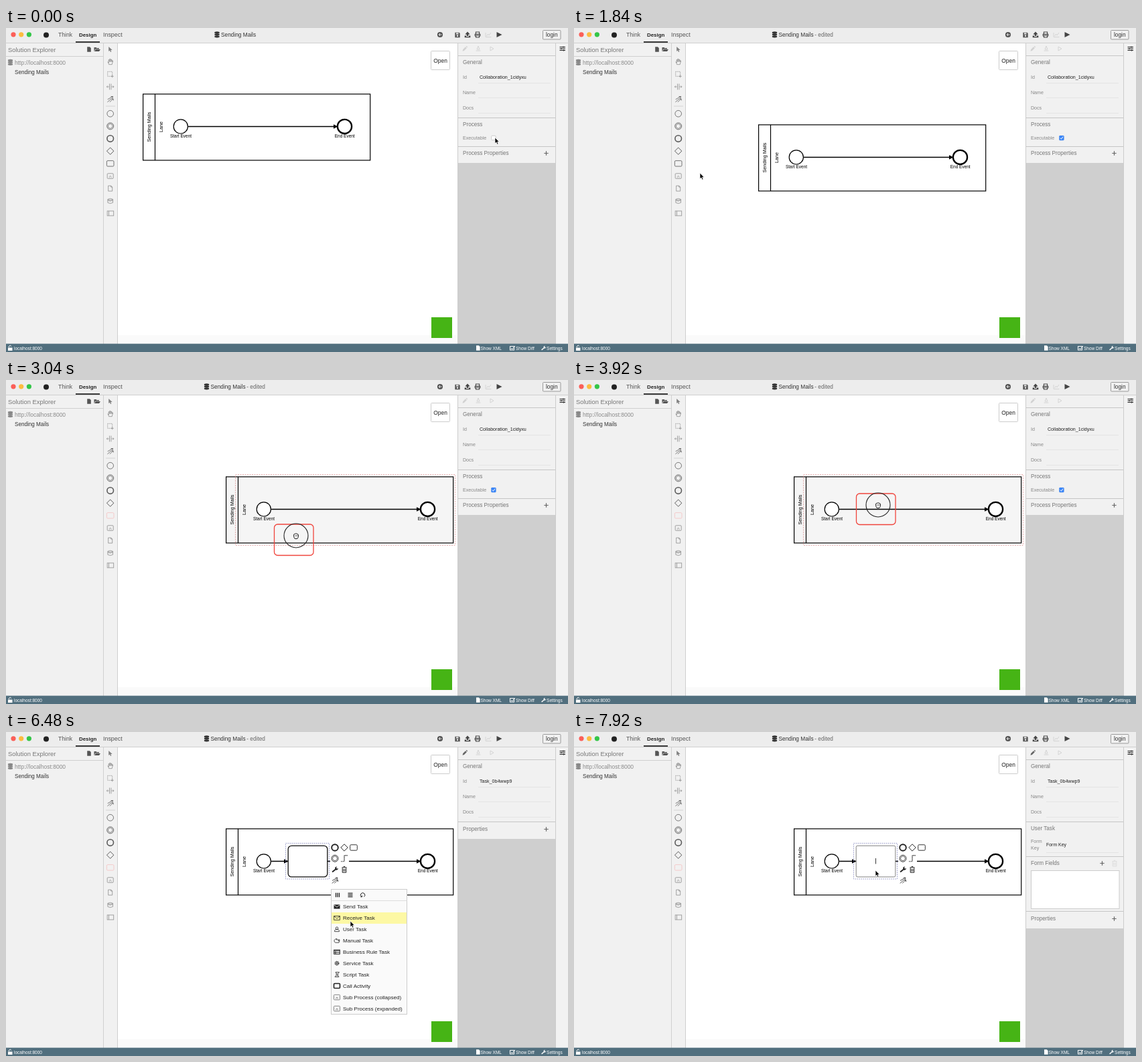
Animation of 839x485 px, one loop 8000 ms. Source, as an HTML page:

```html
<!DOCTYPE html>
<html lang="en">
<head>
<meta charset="utf-8">
<title>Process modeler</title>
<style>
  html, body { margin: 0; width: 100%; height: 100%; overflow: hidden; background: #fff; }
  svg { display: block; width: 100vw; height: 100vh; }
  text { font-family: "Liberation Sans", Arial, sans-serif; white-space: pre; }
  .mid { text-anchor: middle; }
  .line { fill: none; stroke: #222; }
  .grey { fill: none; stroke: #777; stroke-width: .9; }
  .pale { fill: none; stroke: #d4d4d4; }
</style>
</head>
<body>
<svg id="stage" viewBox="0 0 839 485"></svg>
<script>
const text = (x, y, size, str, fill = '#333', more = '') =>
  `<text x="${x}" y="${y}" font-size="${size}" fill="${fill}" ${more}>${str}</text>`;
const rect = (x, y, w, h, fill, more = '') =>
  `<rect x="${x}" y="${y}" width="${w}" height="${h}" fill="${fill}" ${more}/>`;
const path = (d, more = 'class="line"') => `<path d="${d}" ${more}/>`;
const circle = (x, y, r, more = 'class="line"') => `<circle cx="${x}" cy="${y}" r="${r}" ${more}/>`;
const group = (id, body, more = '') => `<g id="${id}" ${more}>${body}</g>`;
const at = (x, y, body, more = '') => `<g transform="translate(${x} ${y})" ${more}>${body}</g>`;
const fill = c => `fill="${c}"`;

// Small icons, each drawn around its own centre
const icon = {
  stack: c => [-2.9, 0, 2.9].map(y =>
    path(`M-3.6 ${y - 1}q3.6 -1.5 7.2 0v1.8q-3.6 1.5 -7.2 0z`, fill(c))).join(''),
  plus: c => path('M-3.2 0H3.2M0 -3.2V3.2', `stroke="${c}" stroke-width="1.2"`),
  file: c => path('M-2.8 -3.8H1L2.8 -2V3.8H-2.8z', fill(c)),
  folder: c => path('M-4.5 3V-3H-1.5L-.5 -2H3V-.5H-2.5z M-2 0H5L3 3H-4z', fill(c)),
  pen: c => path('M-3.5 3.8L-2.8 1L1 -2.8L2.9 -1L-1 2.9zM1.6 -3.4L3.4 -1.6L4 -3L2.6 -4z', fill(c)),
  bolt: () => path('M-4.3 4.3L1.5 -.8M-4 .3L3.5 -4M.8 -4H4L3 -1M-.8 4.3L4 -.5M1.5 -.5H4.5V2', 'class="line" stroke-width=".8"'),
  box: () => rect(-5.3, -4.2, 10.6, 8.4, 'none', 'rx="1.5" stroke="#333"'),
  diamond: () => path('M0 -5.2L5.2 0L0 5.2L-5.2 0z'),
  ring: w => circle(0, 0, 4.8, `class="line" stroke-width="${w}"`),
  double: () => circle(0, 0, 5, 'class="line" stroke-width=".9"') + circle(0, 0, 3.4, 'class="line" stroke-width=".7"'),
  wrench: c => path('M-4.5 3L.2 -.8Q-.4 -4 3 -4.2L2 -2.3L3.5 -1L5 -2Q4.6 1.3 1.4 .8L-3.3 4.5z', fill(c)),
  trash: c => path('M-3.5 -3H3.5M-1.2 -4.3H1.2M-2.8 -2.5V4.5H2.8V-2.5M-1 -1V3M1 -1V3',
    `fill="none" stroke="${c}"`),
  sub: () => rect(-4.5, -3.7, 9, 7.6, 'none', 'class="grey" rx="1"') +
    path('M-2 1.8H-.6M.6 1.8H2M-1.2 .3H1.2', 'class="grey"'),
  user: () => circle(0, -1.6, 1.8, 'class="line" stroke-width=".8"') +
    path('M-3.4 3.4V1.6Q-2.5 .3 -1 .3H1Q2.5 .3 3.4 1.6V3.4z', 'class="line" stroke-width=".8"'),
  gear: () => circle(0, 0, 2.6, 'class="line" stroke-width="1.5" stroke-dasharray="1.4 .7"') + circle(0, 0, 1),
};

// Window chrome
function titleBar() {
  return rect(0, 0, 839, 23, '#ededed') + path('M0 22.5H839', 'stroke="#cfcfcf"') +
    ['#fb5f58', '#fcbc3f', '#34c648'].map((c, i) => circle(11 + i * 11.7, 9.8, 3.6, fill(c))).join('') +
    circle(60, 10.5, 4, fill('#222')) +
    text(78, 13, 8.6, 'Think', '#555') +
    text(109, 13, 7.9, 'Design', '#222', 'font-weight="bold"') +
    text(145, 13, 8.9, 'Inspect', '#555') + rect(104, 20.2, 36, 1.6, '#111') +
    group('title', at(315, 10, icon.stack('#333')) + text(321, 13, 8.3, 'Sending Mails')) +
    group('edited', text(358, 13, 8.3, ' - edited', '#666')) +
    at(648, 10, circle(0, 0, 4.1, fill('#555')) + path('M2.5 0H-2M0 -2L-2 0L0 2', 'fill="none" stroke="#eee"')) +
    at(674, 10.5, path('M-3.7 -3.7H2.5L3.7 -2.5V3.7H-3.7z', fill('#555')) +
      rect(-2, -3, 3.5, 2, '#eee') + circle(0, 1.3, 1.2, fill('#eee'))) +
    at(689, 10, path('M0 -4.5L3.6 -.5H1.3V2H-1.3V-.5H-3.6zM-4.3 1.5H-2V3H2V1.5H4.3V4.3H-4.3z', fill('#444'))) +
    at(704, 10, path('M-2.6 -.5V-4H2.6V-.5M-3.8 2.5V-.6H3.8V2.5M-2.5 1.3H2.5V4H-2.5z', 'fill="none" stroke="#444" stroke-width="1.1"')) +
    at(720, 10, path('M-4 -3V3.5H4.5M-2.5 2L-.5 -1L1 1L4 -3', 'class="pale"')) +
    path('M732.5 6L740.5 10L732.5 14z', fill('#444')) +
    rect(801.5, 3.5, 26.5, 13.5, '#f1f1f1', 'rx="1" stroke="#9a9a9a"') +
    text(814.8, 13, 8.4, 'login', '#333', 'class="mid"');
}

function explorer() {
  return rect(0, 23, 146, 450, '#f1f1f1') + text(3, 36, 9.4, 'Solution Explorer', '#777') +
    at(124, 32, icon.file('#555')) + at(136, 32, icon.folder('#555')) +
    path('M0 42.5H145M145.5 23V473', 'stroke="#d0d0d0"') +
    at(6.5, 51.5, icon.stack('#888')) + text(13, 54.5, 8.5, 'http://localhost:8000', '#8a8a8a') +
    text(13, 68.5, 8.15, 'Sending Mails');
}

function palette() {
  const items = [
    path('M-2.5 -4V3L-.8 1.5L.3 4L1.6 3.4L.6 1H3z', fill('#555')),
    path('M-3.5 0L-2 4H2.5L4 -1.5L2.6 -2V0L2 -3.5H.8V0L.3 -4.2H-1V0L-1.6 -3H-2.5V1.5z', 'class="grey"'),
    rect(-4, -4, 7, 7, 'none', 'class="grey" stroke-dasharray="1.5 1"') + path('M1 3H5M3 1V5', 'class="grey"'),
    path('M-1.2 -4.5V4.5M1.2 -4.5V4.5M-5 0H-2M5 0H2M-4 -1.5L-5.3 0L-4 1.5M4 -1.5L5.3 0L4 1.5', 'class="grey"'),
    icon.bolt(), icon.ring(.8), icon.double(), icon.ring(1.6), icon.diamond(),
    group('taskTool', icon.box()), icon.sub(),
    path('M-3 -4H1L3 -2V4H-3zM1 -4V-2H3', 'class="grey"'),
    path('M-3.8 -2.3Q0 -4.8 3.8 -2.3V2.7Q0 5 -3.8 2.7zM-3.8 -2.3Q0 0 3.8 -2.3M-3.8 -.8Q0 1.5 3.8 -.8', 'class="grey"'),
    rect(-4.5, -3.5, 9.5, 7, 'none', 'class="grey"') + path('M-2.2 -3.5V3.5', 'class="grey"'),
  ];
  return rect(146, 23, 21, 450, '#f1f1f1') + path('M166.5 23V473', 'stroke="#cfcfcf"') +
    path('M149 117H163', 'class="pale"') +
    items.map((body, i) => at(155.7, (i < 5 ? 32 : 35) + i * 18.65, body, 'opacity=".72"')).join('');
}

function statusBar() {
  const ink = '#fff';
  return rect(0, 472.6, 839, 12.4, '#516f7e') +
    rect(3, 478.5, 6.5, 4.5, ink) + path('M4.3 478V476.5Q6.2 473.6 8 476.5', 'fill="none" stroke="#fff"') +
    text(12, 482, 6.5, 'localhost:8000', ink) +
    at(704.8, 479, icon.file(ink)) + text(708.5, 482, 6.5, 'Show XML', ink) +
    rect(752.5, 476.5, 6, 5.5, 'none', 'stroke="#fff"') + path('M754 479L755.5 481L760 476', 'fill="none" stroke="#fff"') +
    text(761, 482, 6.5, 'Show Diff', ink) +
    at(802.5, 479, `<g transform="scale(.75)">${icon.wrench(ink)}</g>`) + text(807, 482, 6.6, 'Settings', ink);
}

// Property panel
const head = (y, str) => text(682, y, 8.15, str, '#777');
const label = (y, str) => text(682, y, 7.1, str, '#888');
const rule = y => path(`M675 ${y}H820`, 'stroke="#c6c6c6"');
const field = y => path(`M705 ${y}H813`, 'stroke="#e4e4e4"');
const add = (x, y) => at(x, y, icon.plus('#666'));

function panel() {
  return rect(675, 23, 146, 450, '#cfcfcf') + rect(675, 23, 146, 112, '#f1f1f1') +
    at(705, 31, path('M-3.5 3H3.5M-2 1L0 -4L2 1z', 'class="pale"')) +
    at(725, 31, path('M-2 -3V3M-2 -3L3 0L-2 3', 'class="pale"')) +
    rule(41.5) + head(54, 'General') +
    label(76, 'Id') + label(99, 'Name') + label(122, 'Docs') +
    field(82.5) + field(104.5) + field(127.5) +
    group('poolPanel', at(685, 31, icon.pen('#d2d2d2')) + rect(675, 134, 146, 68, '#f1f1f1') +
      text(707, 76, 7.1, 'Collaboration_1cidyxu', '#222') + rule(134.5) +
      head(147, 'Process') + label(167, 'Executable') +
      rect(724.7, 161.3, 6.4, 6.4, '#fff', 'rx="1" stroke="#bbb" stroke-width=".7"') +
      group('check', rect(724.3, 161, 7.2, 7.2, '#3b86f7', 'rx="1.3"') +
        path('M726 164.7L727.4 166.3L730 162.7', 'fill="none" stroke="#fff"')) +
      rule(177.5) + head(189.5, 'Process Properties') + add(806.5, 187.5)) +
    group('taskPanel', at(685, 31, icon.pen('#666')) + text(707, 76, 7.1, 'Task_0b4wwp9', '#222') +
      group('plainTask', rect(675, 134, 146, 26, '#f1f1f1') + rule(134.5) +
        head(147.5, 'Properties') + add(806.5, 145.5)) +
      group('userTask', rect(675, 134, 146, 160, '#f1f1f1') + rule(134.5) + head(147, 'User Task') +
        label(166, 'Form') + label(176, 'Key') + text(705, 171, 6.95, 'Form Key', '#222') + field(180.5) +
        rule(186.5) + head(198.5, 'Form Fields') + add(788.5, 196.5) + at(807, 196.5, icon.trash('#ddd')) +
        rect(682.5, 207.5, 131.5, 57, '#fff', 'stroke="#ccc"') +
        rule(268.5) + head(281.5, 'Properties') + add(806.5, 279.5))) +
    path('M674.5 23V473', 'id="divider" stroke="#cccccc"') +
    rect(821, 23, 18, 449, '#f2f2f2') + path('M820.5 23V473', 'stroke="#cccccc"') +
    path('M826.5 28.5H835M826.5 31H835M826.5 33.5H835M832 27.5V29.5M829 30V32M832.5 32.5V34.5', 'class="line" stroke-width="1.1"');
}

// Diagram, in its starting place
const arrowHead = x => path(`M${x} 147.5l-6.5 -3.3v6.6z`, fill('#000'));
function diagram() {
  const side = (x, str) => `<text transform="translate(${x} 148) rotate(-90)" font-size="7.15" class="mid">${str}</text>`;
  return rect(204.6, 98.9, 339.1, 99.1, '#fff', 'id="pool" stroke="#000" stroke-width="1.2"') +
    path('M222.5 99V198', 'stroke="#000" stroke-width="1.2"') +
    side(215.5, 'Sending Mails') + side(233.5, 'Lane') +
    circle(260.8, 147.4, 10.6, 'fill="#fff" stroke="#000" stroke-width="1.2"') +
    circle(505.5, 147.4, 10.6, 'fill="#fff" stroke="#000" stroke-width="2.3"') +
    path('M272 147.5H490', 'stroke="#000" stroke-width="1.3"') + arrowHead(495.5) +
    text(261, 163.5, 6.5, 'Start Event', '#000', 'class="mid"') +
    text(505.7, 163.5, 6.5, 'End Event', '#000', 'class="mid"') +
    rect(218.5, 95.5, 328, 106, 'none', 'id="hoverLine" stroke="#e39a9a" stroke-width=".8" stroke-dasharray="2 1.5"');
}

function task() {
  return at(124, 46, arrowHead(297.5)) +
    rect(421.2, 170.3, 58.6, 46.6, '#fff', 'id="taskBox" rx="5"') +
    rect(417.5, 166.5, 65, 53.5, 'none', 'stroke="#8d8fc4" stroke-dasharray="1.6 1.4" stroke-width=".9"') +
    group('userMark', at(428, 177, icon.user())) +
    group('caret', path('M450.5 189V197.5', 'class="line" stroke-width=".9"'));
}

const padSpots = [[491, 173], [505, 173], [519, 173], [491, 189.3], [505, 189.3], [491, 205.8], [505, 205.8], [491, 222.2]];
function contextPad() {
  const items = [icon.ring(1.9), icon.diamond(), icon.box(), icon.double(),
    path('M-5 4.5H0V-4.5H5', 'class="line" stroke-dasharray="1.5 1"') + path('M0 -4.5H5M0 -4.5V4', 'class="grey"'),
    icon.wrench('#222'), icon.trash('#222'), icon.bolt()];
  return padSpots.map(([x, y], i) =>
    at(x, y, rect(-7, -7.5, 14, 15, '#fff', `id="pad${i}"`) + items[i])).join('');
}

const rowY = i => 261.4 + i * 16.95;
const rows = ['Send Task', 'Receive Task', 'User Task', 'Manual Task', 'Business Rule Task', 'Service Task',
  'Script Task', 'Call Activity', 'Sub Process (collapsed)', 'Sub Process (expanded)'];
function menu() {
  const marks = [
    rect(-4.5, -3, 9, 6.2, '#222') + path('M-4.5 -2.6L0 .7L4.5 -2.6', 'fill="none" stroke="#fff" stroke-width=".8"'),
    rect(-4.3, -2.8, 8.6, 5.8, 'none', 'class="line" stroke-width=".8"') + path('M-4.3 -2.6L0 .8L4.3 -2.6', 'class="line" stroke-width=".8"'),
    icon.user(),
    path('M-4 -.5Q-2.5 -3 0 -2.7L-1 -1.3H4V0H1.8L3.8 .9L3 3H-2.5Q-4.3 2 -4 -.5', 'class="line" stroke-width=".8"'),
    rect(-4.3, -3, 8.6, 6.2, 'none', 'class="line"') + path('M-4.3 -2H4.3M-4.3 .7H4.3M-2 -1V3', 'class="line"'),
    icon.gear(),
    path('M-2 -3.5H3.5Q-.5 0 3 3.5H-3Q1 0 -2 -3.5M-1 -1H1M-.5 1.5H1.5', 'class="line" stroke-width=".8"'),
    rect(-4.5, -3.5, 9, 7, 'none', 'rx="1.3" class="line" stroke-width="1.6"'), icon.sub(), icon.sub()];
  return rect(485.5, 235.5, 113, 187, '#fafafa', 'stroke="#cccccc"') + path('M485.5 252.5H598.5', 'stroke="#ddd"') +
    path('M492.5 240.7V247.3M495 240.7V247.3M497.5 240.7V247.3M510.5 241.3H517.5M510.5 244H517.5M510.5 246.7H517.5', 'class="line" stroke-width="1.3"') +
    path('M530.5 246.5A3.2 3.2 0 1 1 534.5 246.6M529.3 246.8H531.5V244.8') +
    rows.map((str, i) => rect(486, Math.round(rowY(i) - 8.4), 112, 17, 'none', `id="row${i}"`) +
      at(494, rowY(i), marks[i]) + text(503, rowY(i) + 2.9, 8.05, str, '#222')).join('');
}

document.getElementById('stage').innerHTML =
  rect(167, 23, 508, 450, '#fff', 'id="canvas"') + rect(167, 460, 508, 12, '#fafafa', 'id="footer"') +
  group('diagram', diagram()) + group('task', task()) +
  rect(635, 433, 31, 31, '#46b415') +
  rect(634.5, 34.5, 28, 28, '#fff', 'id="open" rx="1"') +
  text(648.6, 51.7, 8.4, 'Open', '#222', 'class="mid"') +
  group('pad', contextPad()) + group('menu', menu()) +
  rect(0, 0, 58.5, 46.5, 'none', 'id="ghost" rx="5" stroke="#f0443c" stroke-width="1.3"') +
  titleBar() + explorer() + palette() + panel() + statusBar() +
  group('pointer', circle(0, 0, 18, 'id="press" class="line" stroke-width="1.1"') +
    path('M0 0V8.8L2 7L3.4 10.2L5 9.5L3.6 6.4H6.2z', 'id="arrow" fill="#000" stroke="#fff" stroke-width=".7"') +
    group('hand', path('M-3.5 -1Q-3 -3 -1.5 -2.6Q0 -3.8 1.3 -2.7Q3.5 -2.8 3.5 0Q3.5 3.2 1.8 4.6H-1.8Q-3.6 3 -3.5 -1z', 'fill="#fff" stroke="#000" stroke-width=".9"') +
      path('M-1.2 -.7V1M.4 -.7V1M2 -.7V1', 'class="line" stroke-width=".7"')));

const el = {};
document.querySelectorAll('[id]').forEach(node => el[node.id] = node);
const show = (id, on) => el[id].style.display = on ? '' : 'none';
const set = (id, name, value) => el[id].setAttribute(name, value);
const move = (id, x, y) => set(id, 'transform', `translate(${x} ${y})`);

// Each stop is [time, x, y]
const pointerStops = [[0, 730, 164], [400, 730, 164], [960, 350, 165], [1040, 350, 165], [1440, 421, 211],
  [1520, 421, 211], [1840, 188, 217], [2080, 158, 204], [2240, 158, 204], [2480, 176, 213], [3040, 433, 233],
  [3680, 454, 187], [4000, 454, 187], [4720, 490, 219], [4880, 490, 219], [5040, 491, 204], [5520, 491, 204],
  [6480, 514, 283], [6800, 520, 294], [7040, 520, 294], [7680, 450, 207], [8000, 450, 207]];
const panStops = [[0, 0, 0], [1040, 0, 0], [1440, 71, 46], [2160, 71, 46], [2520, 124, 46], [8000, 124, 46]];

const smooth = u => u * u * (3 - 2 * u);
function along(stops, t, ease = smooth) {
  const i = stops.findIndex(s => s[0] > t);
  const [a, b] = [stops[i - 1], stops[i]];
  const k = ease((t - a[0]) / (b[0] - a[0]));
  return [1, 2].map(n => Math.round(a[n] + (b[n] - a[n]) * k));
}

function draw(t) {
  const within = (a, b) => t >= a && t < b;
  const [x, y] = along(pointerStops, t);
  // Edge scrolling runs at a steady speed, dragging by hand does not
  const [dx, dy] = along(panStops, t, t < 2160 ? smooth : u => u);
  const edited = t >= 160, placed = t >= 4000, user = t >= 7120;
  const dragging = within(2560, 4000), creating = within(2400, 4000);
  const overPool = x > 204 + dx, blocked = creating && !overPool;
  const editing = within(4000, 5200) || t >= 7760;
  const menuOpen = within(5280, 7040);

  move('diagram', dx, dy);
  move('title', edited ? -15.5 : 0, 0);
  move('edited', -1, 0);
  show('edited', edited);
  show('check', edited);

  const ground = blocked ? '#f8dbe2' : '#fff';
  set('canvas', 'fill', ground);
  show('footer', !blocked);
  set('open', 'fill', blocked ? '#f7f7f7' : '#fff');
  set('open', 'stroke', blocked ? ground : '#ccc');
  set('divider', 'stroke', blocked ? ground : '#ccc');
  set('pool', 'fill', blocked ? '#f9faf9' : creating ? '#f5f5f5' : '#fff');
  show('hoverLine', creating && overPool);
  el.taskTool.firstChild.setAttribute('stroke', t < 2080 ? '#444' : '#f5bcbc');

  show('ghost', dragging);
  move('ghost', x - 32.5, y - 17);
  show('task', placed);
  set('taskBox', 'stroke', editing ? '#777' : '#111');
  set('taskBox', 'stroke-width', editing ? .9 : 1.3);
  set('taskBox', 'rx', editing ? 2 : 5);
  show('caret', editing);
  show('userMark', user && !editing);

  show('pad', placed);
  padSpots.forEach(([px, py], i) => set('pad' + i, 'fill',
    placed && Math.abs(x - px) < 7 && Math.abs(y - py) < 7.5 ? '#fdf6a0' : '#fff'));
  show('menu', menuOpen);
  rows.forEach((_, i) => set('row' + i, 'fill',
    menuOpen && Math.abs(y - rowY(i)) < 8.4 ? '#fdf8a4' : 'none'));

  show('poolPanel', !placed);
  show('taskPanel', placed);
  show('plainTask', !user);
  show('userTask', user);

  move('pointer', x, y);
  show('press', dragging || within(80, 240) || within(1040, 1440) || within(2080, 2160) ||
    within(5200, 5360) || within(6880, 7040) || within(7680, 7760));
  show('hand', dragging || within(1040, 1440));
  show('arrow', !dragging && !within(1040, 1440));
}

const start = performance.now();
function tick(now) {
  const t = Math.max(0, now - start) % 8000;
  draw(t - t % 80);
  requestAnimationFrame(tick);
}
draw(0);
requestAnimationFrame(tick);
</script>
</body>
</html>
```
